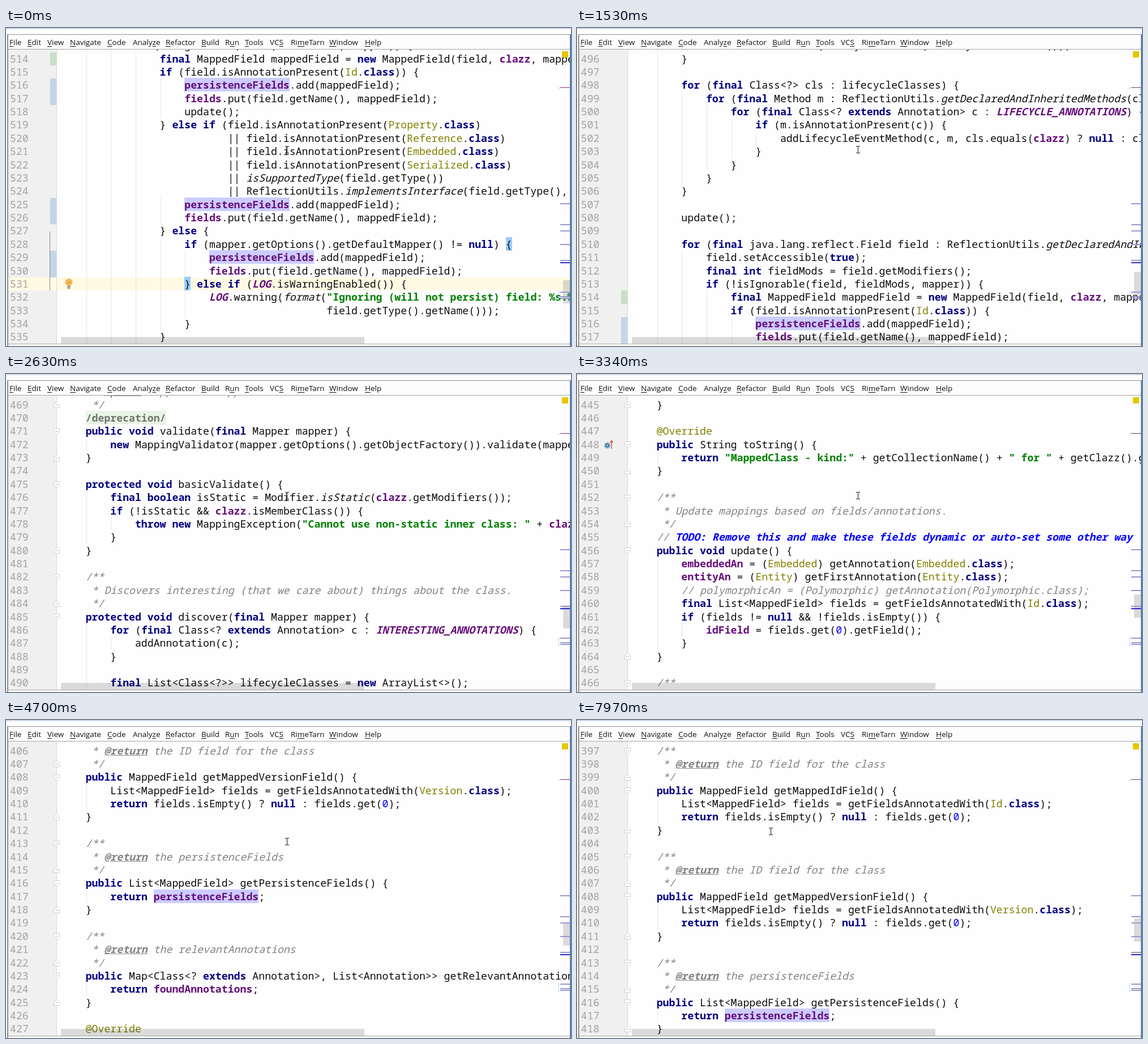
Recreate the animation shown at these times as an HTML page. Size 998 px wide and 561 px high, loop 8000 ms.

```html
<!DOCTYPE html>
<html lang="en">
<head>
<meta charset="utf-8">
<title>Editor scroll</title>
<style>
html, body { margin: 0; width: 100%; height: 100%; overflow: hidden; background: #fff; }
#stage { position: relative; width: 998px; height: 561px; overflow: hidden; background: #fdfdfd; }
#stage div, #stage svg, .menu span { position: absolute; }
.menu span { top: 13px; font: 13.5px/25px "Open Sans", "Noto Sans", sans-serif; color: #111; white-space: pre; }
.menu u { text-underline-offset: 2px; }
#editor { left: 0; top: 38px; width: 996px; height: 519px; overflow: hidden; background: #fefefe; }
#pane { left: 0; width: 996px; }
.num, .code { font: 18.2px/23.38px "Noto Sans Mono", "DejaVu Sans Mono", monospace; white-space: pre; font-variant-ligatures: none; }
.num { left: 7px; color: #a3a3a3; }
.code { left: 97px; color: #0c0c0c; }
.kw { color: #000080; font-weight: bold; }
.field { color: #660e7a; font-weight: bold; }
.konst { color: #660e7a; font-weight: bold; font-style: italic; }
.ann { color: #808000; }
.str { color: #008000; font-weight: bold; }
.lit { color: #00f; }
.call, .doc { font-style: italic; }
.doc { color: #828282; }
.tag { font-weight: bold; text-decoration: underline; }
.todo { color: #00f; font-weight: bold; }
.fold { color: #6f746c; background: #e9f5e6; font-weight: bold; }
.hit { background: #ccccff; }
.brace { background: #99ccff; }
</style>
</head>
<body>
<div id="stage">
  <div id="editor"><div id="pane"></div></div>
</div>
<script>
const LOOP = 8000, PITCH = 23.38, CW = 10.92, X0 = 97, FIRST = 397;

const source = `    /**
     * @return the ID field for the class
     */
    public MappedField getMappedIdField() {
        List<MappedField> fields = getFieldsAnnotatedWith(Id.class);
        return fields.isEmpty() ? null : fields.get(0);
    }

    /**
     * @return the ID field for the class
     */
    public MappedField getMappedVersionField() {
        List<MappedField> fields = getFieldsAnnotatedWith(Version.class);
        return fields.isEmpty() ? null : fields.get(0);
    }

    /**
     * @return the persistenceFields
     */
    public List<MappedField> getPersistenceFields() {
        return persistenceFields;
    }

    /**
     * @return the relevantAnnotations
     */
    public Map<Class<? extends Annotation>, List<Annotation>> getRelevantAnnotations() {
        return foundAnnotations;
    }

    @Override
    public int hashCode() {
        return clazz.hashCode();
    }

    @Override
    public boolean equals(final Object o) {
        if (this == o) {
            return true;
        }
        if (o == null || getClass() != o.getClass()) {
            return false;
        }

        final MappedClass that = (MappedClass) o;

        return clazz.equals(that.clazz);

    }

    @Override
    public String toString() {
        return "MappedClass - kind:" + getCollectionName() + " for " + getClazz().getName();
    }

    /**
     * Update mappings based on fields/annotations.
     */
    // TODO: Remove this and make these fields dynamic or auto-set some other way
    public void update() {
        embeddedAn = (Embedded) getAnnotation(Embedded.class);
        entityAn = (Entity) getFirstAnnotation(Entity.class);
        // polymorphicAn = (Polymorphic) getAnnotation(Polymorphic.class);
        final List<MappedField> fields = getFieldsAnnotatedWith(Id.class);
        if (fields != null && !fields.isEmpty()) {
            idField = fields.get(0).getField();
        }
    }

    /**
     * Validates this MappedClass
     * @param mapper the Mapper to use for validation
     */
    /deprecation/
    public void validate(final Mapper mapper) {
        new MappingValidator(mapper.getOptions().getObjectFactory()).validate(mapper, this);
    }

    protected void basicValidate() {
        final boolean isStatic = Modifier.isStatic(clazz.getModifiers());
        if (!isStatic && clazz.isMemberClass()) {
            throw new MappingException("Cannot use non-static inner class: " + clazz);
        }
    }

    /**
     * Discovers interesting (that we care about) things about the class.
     */
    protected void discover(final Mapper mapper) {
        for (final Class<? extends Annotation> c : INTERESTING_ANNOTATIONS) {
            addAnnotation(c);
        }

        final List<Class<?>> lifecycleClasses = new ArrayList<>();
        lifecycleClasses.add(clazz);

        final EntityListeners entityLisAnn = (EntityListeners) getAnnotation(EntityListeners.class);
        if (entityLisAnn != null && entityLisAnn.value().length != 0) {
            Collections.addAll(lifecycleClasses, entityLisAnn.value());
        }

        for (final Class<?> cls : lifecycleClasses) {
            for (final Method m : ReflectionUtils.getDeclaredAndInheritedMethods(cls)) {
                for (final Class<? extends Annotation> c : LIFECYCLE_ANNOTATIONS) {
                    if (m.isAnnotationPresent(c)) {
                        addLifecycleEventMethod(c, m, cls.equals(clazz) ? null : cls);
                    }
                }
            }
        }

        update();

        for (final java.lang.reflect.Field field : ReflectionUtils.getDeclaredAndInheritedFields(clazz)) {
            field.setAccessible(true);
            final int fieldMods = field.getModifiers();
            if (!isIgnorable(field, fieldMods, mapper)) {
                final MappedField mappedField = new MappedField(field, clazz, mapper);
                if (field.isAnnotationPresent(Id.class)) {
                    persistenceFields.add(mappedField);
                    fields.put(field.getName(), mappedField);
                    update();
                } else if (field.isAnnotationPresent(Property.class)
                           || field.isAnnotationPresent(Reference.class)
                           || field.isAnnotationPresent(Embedded.class)
                           || field.isAnnotationPresent(Serialized.class)
                           || isSupportedType(field.getType())
                           || ReflectionUtils.implementsInterface(field.getType(), List.class)) {
                    persistenceFields.add(mappedField);
                    fields.put(field.getName(), mappedField);
                } else {
                    if (mapper.getOptions().getDefaultMapper() != null) {
                        persistenceFields.add(mappedField);
                        fields.put(field.getName(), mappedField);
                    } else if (LOG.isWarningEnabled()) {
                        LOG.warning(format("Ignoring (will not persist) field: %s.%s [type:%s]",
                                           field.getType().getName()));
                    }
                }`.split("\n");

const rules = {
  str: /"[^"]*"/,
  kw: /\b(?:public|protected|final|void|return|null|new|if|else|for|throw|int|boolean|true|false|this|extends|class)\b/,
  ann: /@Override|\b(?:Id|Property|Reference|Embedded|Serialized|EntityListeners|Entity|Version)\b/,
  field: /\b(?:persistenceFields|foundAnnotations|embeddedAn|entityAn|idField|clazz|length|fields(?=\.put))\b/,
  konst: /\b[A-Z_]{3,}\b/,
  call: /\b(?:addAll|isSupportedType|implementsInterface|getDeclaredAndInherited\w+|(?:format|isStatic)(?=\())/,
  lit: /\b\d+\b/,
  brace: /[{}]/
};
const lexer = new RegExp(Object.entries(rules).map(([k, r]) => `(?<${k}>${r.source})`).join("|"), "g");

const $ = id => document.getElementById(id);
const stage = $("stage"), editor = $("editor"), pane = $("pane");

function box(parent, x, y, w, h, color) {
  const d = document.createElement("div");
  d.style.cssText = `left:${x}px;top:${y}px;width:${w}px;height:${h}px;background:${color}`;
  parent.append(d);
  return d;
}
function text(parent, cls, str, tag = "span") {
  const s = document.createElement(tag);
  s.className = cls;
  s.textContent = str;
  parent.append(s);
  return s;
}
function icon(parent, x, y, w, h, body) {
  parent.insertAdjacentHTML("beforeend",
    `<svg style="left:${x}px;top:${y}px" width="${w}" height="${h}">${body}</svg>`);
  return parent.lastElementChild;
}
const lineY = n => (n - FIRST) * PITCH;

// Gutter and line backgrounds
box(editor, 4, 0, 85, 519, "#f0f0f0");
box(editor, 89, 0, 1, 519, "#d9d9d9");
editor.append(pane);
box(pane, 4, lineY(531), 992, PITCH, "#fffae3");
box(pane, 89, lineY(531), 1, PITCH, "#d9d9d9");
[[514, 1, "#c9dfc8"], [516, 2], [525, 2], [529, 2]].forEach(([n, rows, c = "#c3d6e8"]) =>
  box(pane, 78, lineY(n), 11, rows * PITCH, c));
box(pane, 77, lineY(528) - 11, 1, 4 * PITCH + 11, "#8c8c8c");

function paint(el, line, n) {
  if (/^\s*(\/\*\*|\*|\/\/)/.test(line)) {
    line.split(/(@\w+|TODO.*)/).forEach(s =>
      text(el, "doc" + (s[0] === "@" ? " tag" : s.startsWith("TODO") ? " todo" : ""), s));
    return;
  }
  if (line.includes("/deprecation/")) {
    el.append("    ");
    text(el, "fold", line.trim());
    return;
  }
  let at = 0;
  for (const m of line.matchAll(lexer)) {
    el.append(line.slice(at, m.index));
    at = m.index + m[0].length;
    let cls = Object.keys(m.groups).find(k => m.groups[k]);
    if (cls === "brace" && !(n === 528 && m[0] === "{" || n === 531 && m[0] === "}")) cls = "";
    if (m[0] === "persistenceFields") cls += " hit";
    text(el, cls, m[0]);
  }
  el.append(line.slice(at));
}

// Continuations and comment bodies keep the depth of the line before
const depth = [];
source.forEach((s, i) => {
  const d = s.search(/\S/);
  depth[i] = d < 0 ? Math.min(depth[i - 1], source[i + 1].search(/\S/)) : d % 4 ? depth[i - 1] : d;
});

source.forEach((line, i) => {
  const n = FIRST + i, y = lineY(n);
  for (let c = 4; c < depth[i]; c += 4) box(pane, Math.round(X0 + c * CW) + 1, y, 1, PITCH, "#e6e6e6");
  text(pane, "num", n, "div").style.top = y + "px";
  const code = text(pane, "code", "", "div");
  code.style.top = y + "px";
  paint(code, line, n);

  const opens = /^ {4}(\/\*\*|p.*\{$)/.test(line), closes = /^ {4,5}(\*\/|\})$/.test(line);
  if (opens || closes) {
    const flip = closes ? ' transform="rotate(180 6.5 6.5)"' : "";
    icon(pane, 83, y + 5.5, 13, 13,
      `<path d="M1.5 1.5h10v6.5l-5 4-5-4z" fill="#fff" stroke="#cfcfcf"${flip}/><path d="M4 6.5h5" stroke="#bbb"/>`);
  }
  if (i && source[i - 1].includes("@Override"))
    icon(pane, 47, y + 2, 20, 20,
      '<circle cx="6.5" cy="11" r="5.5" fill="#7fb5d2"/><circle cx="6.5" cy="11" r="2.4" fill="#b9d9e8" stroke="#33566b" stroke-width="1.3"/>' +
      '<path d="M14 17V3M11.5 6 14 2.5 16.500 6" fill="none" stroke="#d9534a" stroke-width="1.5"/>');
});

icon(pane, 103, lineY(531) + 1, 16, 21,
  '<circle cx="8" cy="7.500" r="6.500" fill="#f4b556"/><path d="M5 11h6v4H5z" fill="#f4b556"/>' +
  '<path d="M6 7l2 2 2-2" fill="none" stroke="#c47f22"/><path d="M5 15.500h6M5.500 18h5" stroke="#777" stroke-width="1.600"/>');
const caret = box(pane, X0, lineY(531), 2, PITCH, "#000");

// Scrollbars and error stripe
const bar = "rgba(0,0,0,.14)";
box(editor, 97, 507, 536, 12, bar);
const thumb = box(editor, 984, 0, 12, 41, bar);
box(editor, 982, 3, 11, 11, "#e6c700");
box(editor, 979, 66, 17, 1.5, "#b48bb4");
box(editor, 976, 66, 1, 4, "#a8d8a8");
[309, 346, 357, 381, 409, 465, 473, 476].forEach(y => box(editor, 979, y - 38, 17, 1.5, "#9a9acb"));
box(editor, 979, 374.5, 17, 2, "#2929c8");
[464, 473].forEach(y => box(editor, 976, y - 38, 1, 7, "#a9c7ea"));

// Window frame and menu
box(stage, 0, 0, 998, 2, "#cfdbe8");
box(stage, 2, 11, 994, 1, "#8e8e8e");
box(stage, 2, 11, 1.5, 550, "#8e8e8e");
box(stage, 3, 37, 993, 1, "#a5a5a5");
box(stage, 3, 557, 993, 1, "#a5a5a5");
box(stage, 996, 11, 2, 550, "#4b83b8");
const menu = document.createElement("div");
menu.className = "menu";
stage.append(menu);
[[6, "_File"], [38, "_Edit"], [73, "_View"], [113, "_Navigate"], [179, "_Code"], [224, "Analy_ze"],
 [282, "_Refactor"], [345, "_Build"], [387, "R_un"], [422, "_Tools"], [466, "VC_S"], [503, "Ri_meTarn"],
 [571, "_Window"], [634, "_Help"]].forEach(([x, label]) => {
  const s = text(menu, "", "");
  s.innerHTML = label.replace(/_(.)/, "<u>$1</u>");
  s.style.left = x + "px";
});

const mouse = icon(stage, 0, 0, 9, 15,
  '<path d="M1 1.500h2.500l1 .7 1-.7H8M4.500 2v11M1 13.500h2.500l1-.7 1 .7H8" fill="none" stroke="#222" stroke-width="1.100"/>');

// [ms, first visible line]
const scroll = [[0, 514], [540, 511], [960, 508], [1100, 505], [1230, 502], [1530, 496], [1690, 490],
  [1990, 487], [2120, 481], [2390, 478], [2510, 472], [2630, 469], [2800, 460], [2930, 454], [3340, 445],
  [3490, 439], [3760, 433], [3880, 427], [4190, 421], [4410, 418], [4570, 412], [4700, 406], [7970, 397]];
// [ms, x, y]
const moves = [[0, 496, 214], [5830, 370, 184], [6010, 340, 182], [6130, 318, 179], [6270, 319, 179],
  [6390, 322, 180], [6550, 331, 188], [6700, 345, 196], [6850, 342, 196]];
const pick = (steps, t) => steps.findLast(s => s[0] <= t);

function draw() {
  const t = performance.now() % LOOP;
  const top = pick(scroll, t)[1], [, x, y] = pick(moves, t);
  pane.style.top = 4.5 - lineY(top) + "px";
  thumb.style.top = 312 + 0.812 * (top - FIRST) + "px";
  caret.style.visibility = t >= 820 && t < 960 ? "visible" : "hidden";
  mouse.style.left = x - 4.5 + "px";
  mouse.style.top = y - 7.5 + "px";
  requestAnimationFrame(draw);
}
draw();
</script>
</body>
</html>
```
